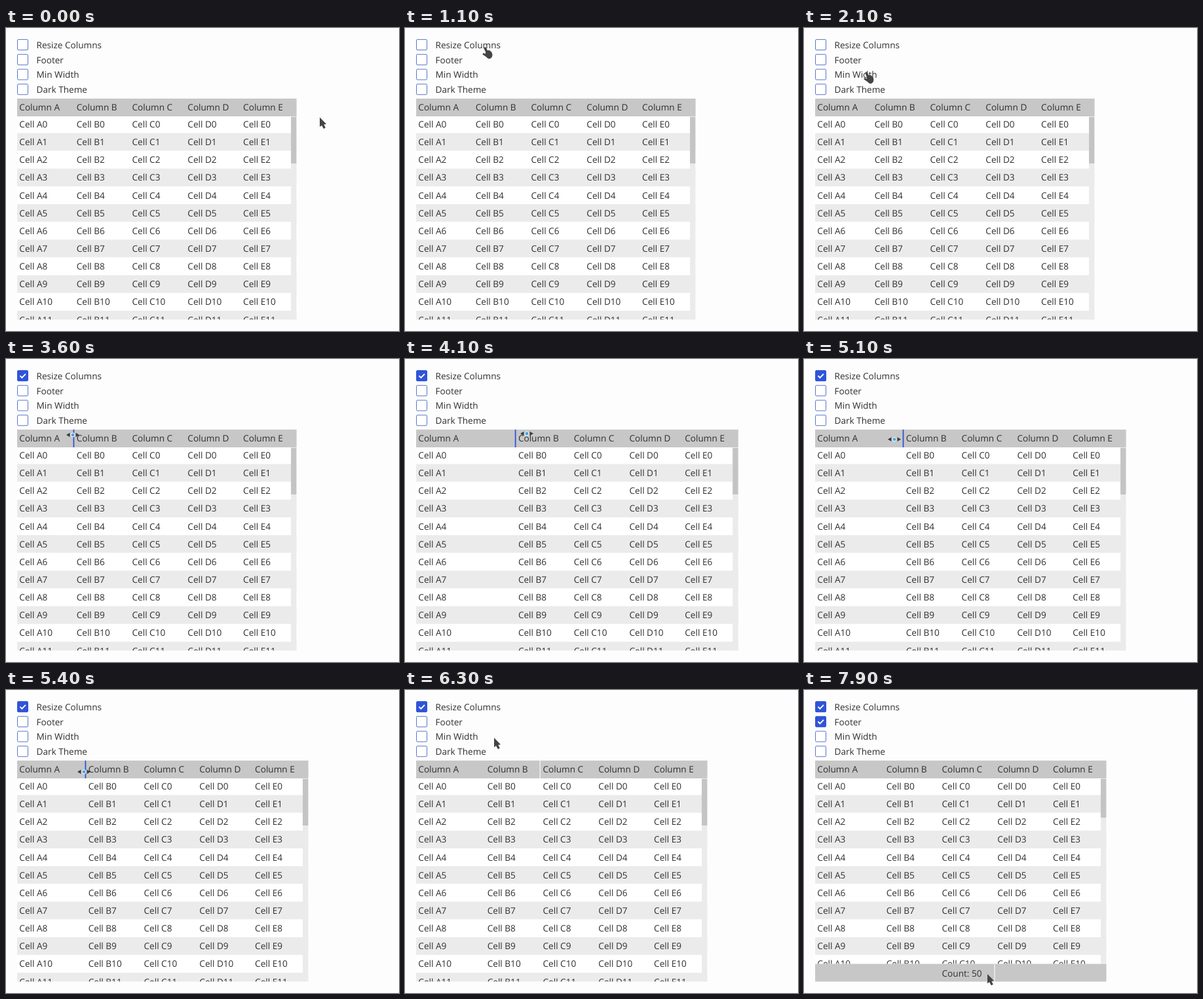
Animation of 600 by 463 pixels, one loop 8 s. Source, as an HTML page with a canvas:

```html
<!DOCTYPE html>
<html lang="en">
<head>
<meta charset="utf-8">
<title>Table options</title>
<style>
  html, body { margin: 0; width: 100%; height: 100%; overflow: hidden; background: #fdfdfd; }
  canvas { display: block; width: 600px; height: 463px; }
</style>
</head>
<body>
<canvas id="stage" width="600" height="463"></canvas>
<script>
const ctx = document.getElementById('stage').getContext('2d');
const LOOP = 8000, STEP = 100;
const LEFT = 17, TOP = 107.8, HEADER_END = 135, BOTTOM = 445.6;
const FIRST_ROW = 133.4, ROW_H = 27.15;
const FIRST_W = 87.4, COL_W = 84.8, BAR_W = 8.5, PAD = 3.3;
const CHECK_RESIZE = 2800, GRAB = 3400, RELEASE = 6100, CHECK_FOOTER = 7300;
const COLORS = {
  page: '#fdfdfd', stripe: '#ebebeb', head: '#c7c7c7', thumb: '#c4c4c4', line: '#f4f4f4',
  text: '#303030', blue: '#2f54d8', border: '#5b74cb', cursor: '#444444'
};

const options = [
  { label: 'Resize Columns', since: CHECK_RESIZE },
  { label: 'Footer', since: CHECK_FOOTER },
  { label: 'Min Width', since: Infinity },
  { label: 'Dark Theme', since: Infinity }
].map((option, i) => ({ ...option, y: 25.6 + i * 22.72 }));

const pointerMoves = [
  { from: 100, to: 900, x: 147, y: 32 },
  { from: 900, to: 1200, x: 112, y: 28 },
  { from: 1300, to: 1700, x: 104, y: 116 },
  { from: 1700, to: 2100, x: 94, y: 67 },
  { from: 2100, to: 2500, x: 90, y: 26 },
  { from: 2800, to: 3400, x: 102, y: 116 },
  { from: 3600, to: 4380, x: 221, y: 113 },
  { from: 4600, to: 5290, x: 119, y: 125 },
  { from: 6000, to: 6300, x: 136, y: 73 },
  { from: 6300, to: 6800, x: 76, y: 47 },
  { from: 7300, to: 7900, x: 280, y: 434 }
];

function ease(t, from, to) {
  const k = Math.min(1, Math.max(0, (t - from) / (to - from)));
  return k * k * (3 - 2 * k);
}

function pointerAt(t) {
  return pointerMoves.reduce((pos, move) => {
    const k = ease(t, move.from, move.to);
    return { x: pos.x + (move.x - pos.x) * k, y: pos.y + (move.y - pos.y) * k };
  }, { x: 479, y: 136.5 });
}

// The column edge trails the pointer out and back.
function firstColumnWidth(t) {
  return FIRST_W + 119 * ease(t, 3600, 4540) - 101 * ease(t, 4650, 5355);
}

function box(color, x, y, w, h) {
  ctx.fillStyle = color;
  ctx.fillRect(x, y, w, h);
}

function text(str, x, centerY) {
  ctx.fillStyle = COLORS.text;
  ctx.fillText(str, x, centerY + 5);
}

function shape(points, x, y, color) {
  ctx.beginPath();
  points.forEach(([px, py]) => ctx.lineTo(x + px, y + py));
  ctx.closePath();
  ctx.fillStyle = color;
  ctx.fill();
}

function stroke(points, x, y, width, color) {
  ctx.beginPath();
  points.forEach(([px, py]) => ctx.lineTo(x + px, y + py));
  ctx.lineWidth = width;
  ctx.strokeStyle = color;
  ctx.stroke();
}

function drawOption({ label, y, since }, t) {
  const checked = t >= since;
  ctx.beginPath();
  ctx.roundRect(17.5, y - 8, 16, 16, 1.5);
  ctx.lineWidth = 1;
  ctx.fillStyle = checked ? COLORS.blue : '#fff';
  ctx.strokeStyle = checked ? COLORS.blue : COLORS.border;
  ctx.fill();
  ctx.stroke();
  if (checked) stroke([[-4, 0], [-1, 3], [4.5, -2.7]], 25.4, y, 2, '#fff');
  text(label, 46.5, y + 0.2);
}

function drawTable(t) {
  const hasFooter = t >= CHECK_FOOTER;
  const bodyEnd = hasFooter ? 418.5 : BOTTOM;
  const edge = LEFT + firstColumnWidth(t);
  const columnEnd = i => edge + i * COL_W;
  const columnStart = i => i ? columnEnd(i - 1) : LEFT;
  const right = columnEnd(4), width = right - LEFT;
  const eachColumn = draw => [...'ABCDE'].forEach((name, i) => draw(name, columnStart(i) + PAD));

  ctx.save();
  ctx.beginPath();
  ctx.rect(LEFT, HEADER_END, width, bodyEnd - HEADER_END);
  ctx.clip();
  for (let row = 0; row < 12; row++) {
    const y = FIRST_ROW + row * ROW_H;
    box(row % 2 ? COLORS.stripe : '#fff', LEFT, y, width, ROW_H);
    eachColumn((name, x) => text(`Cell ${name}${row}`, x, y + ROW_H / 2));
  }
  box(COLORS.stripe, right - BAR_W, HEADER_END, BAR_W, bodyEnd - HEADER_END);
  box(COLORS.thumb, right - BAR_W, 136, BAR_W, hasFooter ? 59 : 71);
  ctx.restore();

  box(COLORS.head, LEFT, TOP, width, HEADER_END - TOP);
  eachColumn((name, x) => text(`Column ${name}`, x, 121.4));
  if (hasFooter) {
    box(COLORS.head, LEFT, bodyEnd, width, BOTTOM - bodyEnd);
    text('Count: 50', columnStart(2) + PAD, 432.7);
  }

  const separator = (col, color, y, w) =>
    box(color, columnEnd(col) - 1 - w / 2, y, w, HEADER_END - TOP);
  if (t >= GRAB && t < RELEASE) separator(0, COLORS.blue, TOP, 1.8);
  if (t >= RELEASE && t < 6400) separator(1, COLORS.line, TOP, 1.3);
  if (t >= 7800) separator(2, COLORS.line, bodyEnd, 1.3);
}

function drawArrow(x, y) {
  shape([[0, 0], [0, 14.5], [3, 12.3], [6, 17.5], [8.8, 15.8], [6.3, 11], [10, 10.3]],
    x, y, COLORS.cursor);
}

function drawHand(x, y) {
  ctx.lineCap = 'round';
  stroke([[1.3, 2], [5, 10]], x, y, 3.6, COLORS.cursor);
  stroke([[-1, 10.8], [4, 14]], x, y, 3, COLORS.cursor);
  ctx.lineCap = 'butt';
  ctx.beginPath();
  ctx.ellipse(x + 7, y + 11.5, 5.3, 6.5, -0.3, 0, Math.PI * 2);
  ctx.fillStyle = COLORS.cursor;
  ctx.fill();
}

function drawResizer(x, y) {
  for (const side of [-1, 1]) {
    shape([[side * 10, 0], [side * 4.5, -3.2], [side * 4.5, 3.2]], x, y, '#3a3a3a');
  }
  for (const [radius, color] of [[3.5, '#dcebf4'], [2.3, '#43a5e2']]) {
    ctx.beginPath();
    ctx.arc(x, y, radius, 0, Math.PI * 2);
    ctx.fillStyle = color;
    ctx.fill();
  }
}

function drawPointer(t) {
  const { x, y } = pointerAt(t);
  const overOption = options.some(({ label, y: center }) =>
    x >= LEFT && x <= 46.5 + ctx.measureText(label).width && Math.abs(y - center) < 11);
  if (t >= GRAB && t < RELEASE) drawResizer(x, y);
  else if (overOption) drawHand(x, y);
  else drawArrow(x, y);
}

function render(now) {
  const t = Math.floor((now % LOOP) / STEP) * STEP;
  box(COLORS.page, 0, 0, 600, 463);
  ctx.font = '13.6px "Open Sans", "Noto Sans", sans-serif';
  ctx.textRendering = 'geometricPrecision';
  options.forEach(option => drawOption(option, t));
  drawTable(t);
  drawPointer(t);
}

const startTime = performance.now();
function tick() {
  render(performance.now() - startTime);
  requestAnimationFrame(tick);
}
tick();
</script>
</body>
</html>
```
